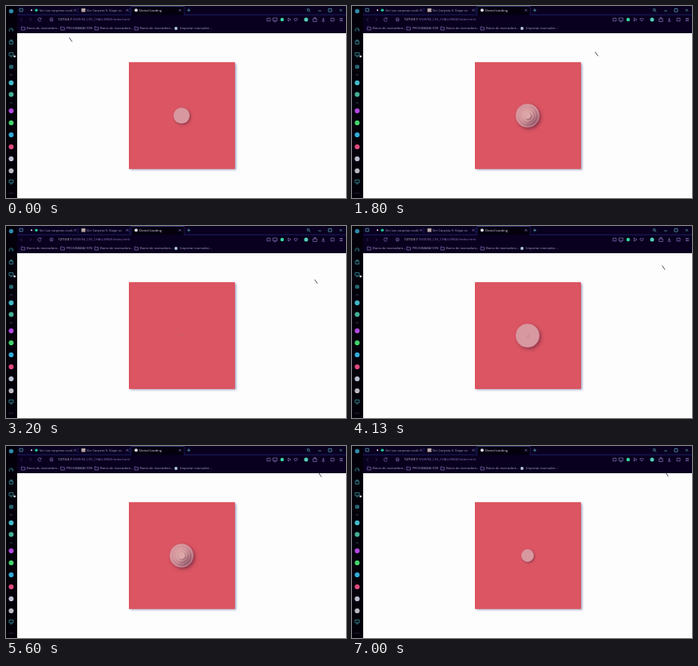
Recreate the animation shown at these times as an HTML page. Size 426 px wide and 240 px high, loop 7.07 s.

```html
<!DOCTYPE html>
<html lang="es">
<head>
<meta charset="utf-8">
<title>Doted Loading</title>
<style>
  html, body { margin: 0; width: 100%; height: 100%; overflow: hidden; background: #fdfdfd; }
  svg { display: block; width: 100vw; height: 100vh; }
  text { font-family: "Open Sans", "Noto Sans", sans-serif; font-size: 4.1px; }
  .line { fill: none; stroke-width: .7; }
  .dot { filter: drop-shadow(2px 2px 2px rgba(70, 20, 50, .5)); }
</style>
</head>
<body>
<svg viewBox="0 0 426 240" preserveAspectRatio="none">
  <defs>
    <filter id="soft" x="-10%" y="-10%" width="120%" height="120%">
      <feDropShadow dx="2" dy="1.5" stdDeviation="1" flood-color="#6474a4" flood-opacity=".55"/>
    </filter>
  </defs>
  <rect width="426" height="240" fill="#fdfdfd"/>
  <rect width="426" height="34" fill="#09001f"/>
  <rect width="14" height="240" fill="#03000a"/>
  <path d="M14 11H157V0H223V11H426" fill="none" stroke="#202a78" stroke-width=".8"/>
  <rect x="157.5" width="65" height="11" fill="#04000e"/>
  <path d="M157 .5H223" stroke="#343a86" stroke-width=".8"/>
  <path d="M90 2V9M155 2V9" stroke="#202a78" stroke-width=".7"/>
  <g id="chrome"></g>
  <rect x="154" y="70.5" width="132.7" height="133" fill="#db5463" filter="url(#soft)"/>
  <rect x="154.4" y="70.9" width="131.9" height="132.2" fill="none" stroke="#dc4c50" stroke-width=".8"/>
  <g id="dots"></g>
  <path id="cursor" d="M-1.8-2.6L1.8 2.6" stroke="#57465c" stroke-width="1"/>
</svg>
<script>
const $ = id => document.getElementById(id);
const NS = "http://www.w3.org/2000/svg";

function add(parent, tag, attrs, text = "") {
  const el = document.createElementNS(NS, tag);
  for (const key in attrs) el.setAttribute(key, attrs[key]);
  el.textContent = text;
  return parent.appendChild(el);
}

const chrome = $("chrome");
const violet = "#8576bd", pale = "#dcd9ea", cyan = "#5fb4c4", teal = "#3eabb5", dim = "#35305f";
const label = (x, y, text, fill = "#a7a0c8") => add(chrome, "text", { x, y, fill }, text);
const disc = (cx, cy, r, fill) => add(chrome, "circle", { cx, cy, r, fill });
const icon = (x, y, d, stroke = violet) =>
  add(chrome, "path", { d, stroke, class: "line", transform: `translate(${x} ${y})` });

const shape = {
  cross: "M-1.4-1.4L1.4 1.4M1.4-1.4L-1.4 1.4",
  plus: "M-2 0H2M0-2V2",
  box: "M-2-1.8H2V1.8H-2Z",
  folder: "M-2.3 2V-2H-.5L.3-1.2H2.3V2Z",
  ring: "M-2 0A2 2 0 1 1 2 0A2 2 0 1 1-2 0",
  reload: "M1.7-1.3A2.1 2.1 0 1 0 2 .8M2-2.3V-.8H.5",
  left: "M1.5-2L-1 0L1.5 2",
  right: "M-1.5-2L1 0L-1.5 2",
  search: "M-1.7-.5A1.4 1.4 0 1 1 1.1-.5A1.4 1.4 0 1 1-1.7-.5M.7.6L2.2 2.1",
  play: "M-1.5-2L2 0L-1.5 2Z",
  heart: "M0 2L-2.2-.3Q-2-2.5 0-1Q2-2.5 2.2-.3Z",
  down: "M0-2.2V1M-1.5-.4L0 1L1.5-.4M-2 2.2H2",
  lines: "M-2-1.5H2M-2 0H2M-2 1.5H2",
  gauge: "M-2 1.8A2.5 2.5 0 1 1 2 1.8M0 .5L1.4-1",
  bag: "M-2.3-1H2.3V2.5H-2.3ZM-1-1V-2.5H1V-1",
  screen: "M-2.6-2H2.6V1.4H-2.6ZM-1.5 2.7H1.5",
  dash: "M-1.8 0H1.8",
  more: "M-2.3 0H-1.5M-.4 0H.4M1.5 0H2.3"
};

// Tabs and window buttons
icon(19, 5, shape.box, cyan);
disc(32, 5.3, 1, pale);
disc(38, 5.3, 1.8, "#23c79a");
label(42, 6.9, "Ver Las carpetas ocult");
add(chrome, "rect", { x: 94.5, y: 3, width: 5, height: 4.5, fill: "#b8a8a5" });
label(101, 6.9, "Ver Carpeta 9: Viajar es");
disc(163, 5.3, 2, pale);
label(167, 6.9, "Doted Loading", pale);
for (const x of [86.5, 152, 218]) icon(x, 5.3, shape.cross);
icon(229, 5.3, shape.plus, cyan);
icon(379, 5.3, shape.search, cyan);
icon(393, 6, shape.dash, cyan);
icon(406, 5.3, shape.box, cyan);
icon(419.5, 5.3, shape.cross, cyan);

// Address bar
icon(19, 17, shape.left, dim);
icon(31, 17, shape.right, dim);
icon(42, 17, shape.reload);
icon(57, 17, shape.ring);
icon(57, 17, "M-1 0H1");
const url = label(65.5, 18.4, "", violet);
add(url, "tspan", { fill: "#efedf6" }, "127.0.0.1");
add(url, "tspan", {}, ":5500/04_CSS_CHALLENGE/index.html");
icon(329, 17, shape.box);
icon(337, 17, shape.screen);
disc(346, 17, 2.2, "#37d5a2");
icon(355, 17, shape.play);
icon(363, 17, shape.heart);
disc(376, 17, 2.5, "#54cdb8");
icon(387, 17, shape.bag);
icon(397.5, 17, shape.down);
icon(409, 17, shape.box);
icon(420, 17, shape.lines);

// Bookmarks
const bookmark = "Barra de marcadore...";
[[21.5, bookmark], [71, "PROGRAMACION"], [113.5, bookmark], [163.5, bookmark]].forEach(([x, text]) => {
  icon(x, 28, shape.folder);
  label(x + 4.5, 29.3, text);
});
disc(213, 28, 1.9, "#b6cce2");
label(218, 29.3, "Importar marcador...");

// Sidebar
disc(6.5, 6.5, 2.8, "#3187a8");
icon(6.5, 30, shape.gauge, teal);
icon(6.5, 45, shape.bag, teal);
icon(6.5, 60.5, shape.screen, teal);
disc(10.7, 63, 1.3, "#e4e7ec");
icon(6.5, 76, shape.box, teal);
icon(6.5, 76, shape.plus, teal);
[[96, "#41b9c8"], [110.5, "#45af91"], [131, "#b348e0"], [146, "#43d368"],
 [161, "#35acd8"], [176, "#df4a7c"], [191, "#b9bfd0"], [206, "#bbbac3"]]
  .forEach(([y, fill]) => disc(6.5, y, 3.1, fill));
icon(6.5, 86, shape.dash, "#4c5670");
icon(6.5, 121, shape.dash, "#4c5670");
icon(6.5, 219.5, shape.screen, teal);
icon(6.5, 234, shape.more);

// Each disc: radius, start and length of growth measured from the empty pose
const dots = [
  [14.8, 250, 410, "#d8989f"],
  [10.8, 620, 360, "#da9da2"],
  [7.8, 980, 360, "#dca3a5"],
  [4.4, 1350, 360, "#dda7a8"]
].map(([r, start, span, fill]) => ({
  start, span, el: add($("dots"), "circle", { r, fill, class: "dot" })
}));

const trail = [[0, 81, 42], [1000, 352, 65], [1800, 306.5, 60], [3200, 388.5, 69.5],
  [5000, 392, 36.5], [6130, 394.5, 35.5], [7070, 394.5, 35.5]];
const clamp = v => Math.max(0, Math.min(1, v));
const LOOP = 7070, STEP = 200 / 3, PERIOD = 4000, EMPTY = 3470;

function draw(now) {
  const t = Math.floor((now % LOOP + 4) / STEP) * STEP;
  const phase = (t - EMPTY + PERIOD) % PERIOD;
  const away = Math.min(phase, PERIOD - phase);
  for (const { start, span, el } of dots) {
    const k = clamp((away - start) / span);
    el.setAttribute("transform", `translate(220 137) scale(${k})`);
    el.setAttribute("visibility", k ? "visible" : "hidden");
  }

  const i = Math.max(1, trail.findIndex(p => p[0] >= t));
  const [t0, x0, y0] = trail[i - 1], [t1, x1, y1] = trail[i];
  const k = clamp((t - t0) / (t1 - t0)), e = k * k * (3 - 2 * k);
  $("cursor").setAttribute("transform", `translate(${x0 + (x1 - x0) * e} ${y0 + (y1 - y0) * e})`);
}

const begin = performance.now();
function tick() {
  draw(performance.now() - begin);
  requestAnimationFrame(tick);
}
tick();
</script>
</body>
</html>
```
